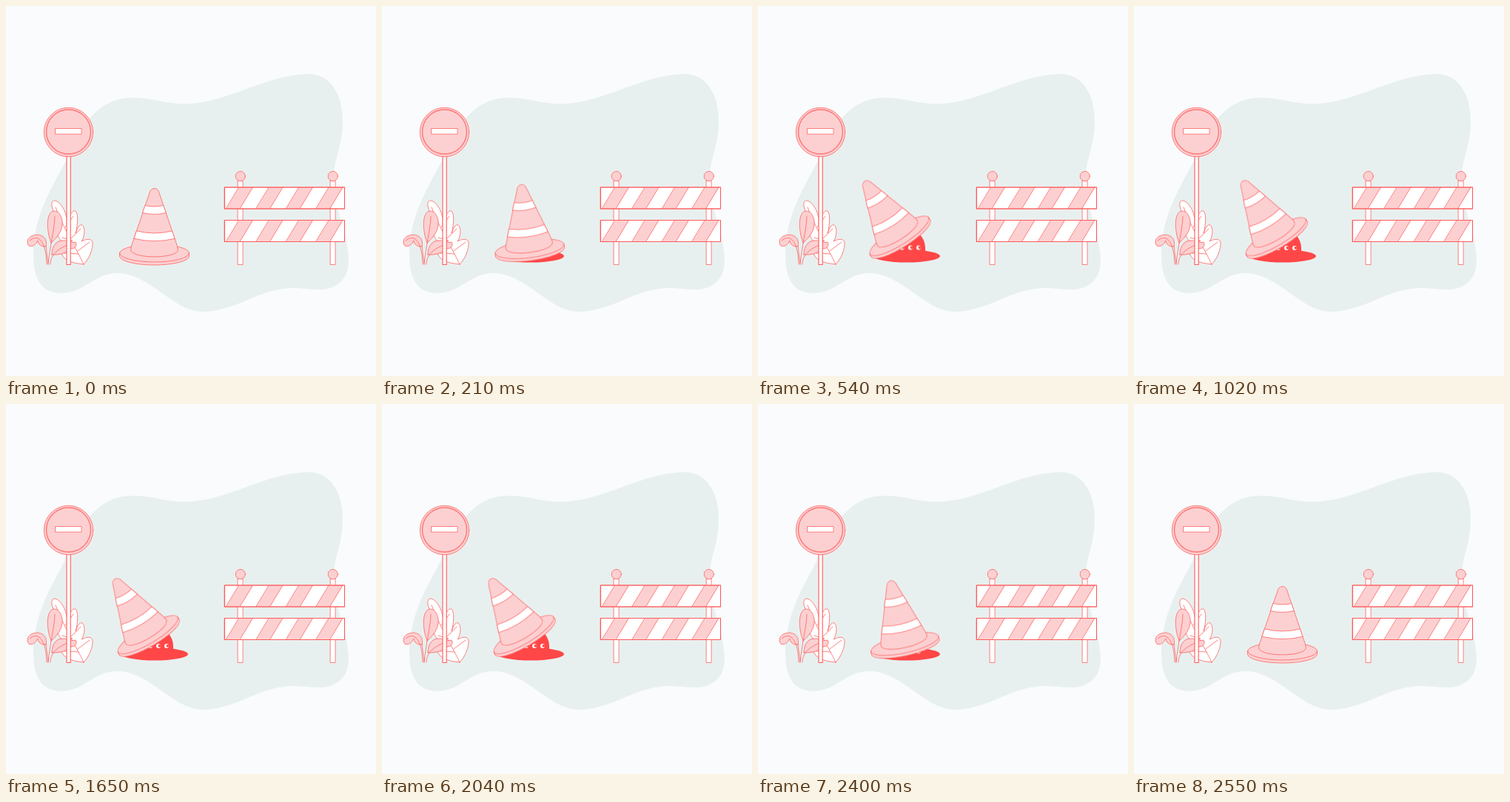
These frames come from a looping animation (500 px wide and 500 px high, 3.45 s). An HTML page:

```html
<!DOCTYPE html>
<html lang="en">
<head>
<meta charset="utf-8">
<title>Roadworks</title>
<style>
  html, body { margin: 0; width: 100%; height: 100%; overflow: hidden; background: #f9fbfd; }
  svg { display: block; width: 100vw; height: 100vh; }
  .line { stroke: #ff5a5a; stroke-width: .75; stroke-linejoin: round; stroke-linecap: round; fill: none; }
  .bold { stroke-width: 1.1; }
  .ring { stroke: #ff7676; stroke-width: 1.4; }
  .pink { fill: #fcd0d1; }
  .white { fill: #fff; }
  .red { fill: #ff4747; }

  #cone { transform-origin: 155.6px 339px; animation: tilt 3450ms linear infinite; }
  #peeker { animation: peek 3450ms linear infinite; }

  /* Percentages are milliseconds / 34.5 */
  @keyframes tilt {
    0%, 3.77% { transform: rotate(0deg); }
    9.57% { transform: rotate(-18.5deg); }
    11.59% { transform: rotate(-27deg); }
    13.33% { transform: rotate(-30.8deg); }
    14.5% { transform: rotate(-32deg); }
    15.65% { transform: rotate(-32.3deg); }
    18.26% { transform: rotate(-31deg); }
    21.45% { transform: rotate(-30.4deg); }
    29.57%, 47.54% { transform: rotate(-30.6deg); }
    56.23% { transform: rotate(-30.4deg); }
    59.13% { transform: rotate(-30.8deg); }
    61.68% { transform: rotate(-32.3deg); }
    62.9% { transform: rotate(-32deg); }
    64.2% { transform: rotate(-30.8deg); }
    66.09% { transform: rotate(-27.6deg); }
    67.77% { transform: rotate(-18.5deg); }
    73.57%, 100% { transform: rotate(0deg); }
  }
  @keyframes peek {
    0%, 3.77% { transform: translateY(12px); }
    9.57% { transform: translateY(5px); }
    13.33% { transform: translateY(0); }
    15.65% { transform: translateY(-.5px); }
    19%, 60% { transform: translateY(0); }
    66.09% { transform: translateY(3px); }
    73.57%, 100% { transform: translateY(12px); }
  }
</style>
</head>
<body>
<svg viewBox="0 0 500 500">
  <defs>
    <clipPath id="ground"><rect x="150" y="280" width="100" height="60"/></clipPath>
    <clipPath id="plank"><rect x="295.5" y="245" width="162" height="29"/></clipPath>
    <g id="eye">
      <circle class="white" r="3"/>
      <circle class="red" cx="1.4" cy="-.2" r="1.9"/>
    </g>
    <g id="post" class="line">
      <rect class="white" x="313.5" y="236" width="6.6" height="113.5"/>
      <circle class="pink" cx="316.8" cy="230" r="6.6"/>
    </g>
    <g id="board" class="line">
      <rect class="white" x="295.5" y="245" width="162" height="29"/>
      <g class="pink" clip-path="url(#plank)">
        <path id="stripe" d="M315 245h18.5l-17.5 29h-18.5z"/>
        <use href="#stripe" x="40.5"/>
        <use href="#stripe" x="81"/>
        <use href="#stripe" x="121.5"/>
      </g>
      <rect class="bold" x="295.5" y="245" width="162" height="29"/>
    </g>
  </defs>

  <path fill="#e8f0ef" d="M37 335C37 310 43 287 52 266C62 242 74 224 84 203C103 157 128 124 170 124
    C200 124 212 132 243 132C298 132 352 92 409 92C440 92 455 122 455 155C455 190 443 205 443 233
    C443 275 463 310 463 345C463 370 445 383 425 383C405 383 400 381 385 381C340 383 310 413 266 413
    C225 413 195 361 150 361C120 361 105 388 75 388C45 388 37 365 37 335Z"/>

  <!-- Plants -->
  <g class="line">
    <path class="white" d="M105 349C112 343 118 327 117 320C116 313 108 315 102 318C107 311 107 299 103 296
      C99 294 96 302 94 307C97 298 98 280 94 277C89 275 84 287 82 295C84 284 76 265 66 263
      C59 263 61 276 70 286C66 300 68 312 76 318C70 322 68 332 76 336C78 343 90 348 105 349Z"/>
    <path d="M105 349C96 330 79 303 67 272M80 299L91 284M88 314L101 301M97 331L113 319M90 317L76 313M98 335L78 334"/>
    <path class="pink" d="M61 320C55 305 54 283 62 278C70 274 77 284 76 296C75 306 67 315 61 320Z"/>
    <path d="M66 284C66 300 59 325 57 349"/>
    <path class="pink" d="M54 325C57 312 46 307 37 310C29 312 27 320 31 324C36 327 41 321 43 317C43 322 48 326 54 325Z"/>
    <path d="M32 317C42 308 54 315 55 349M54 325C55 333 56 341 57 349"/>
    <path class="pink" d="M62 336C62 322 70 316 78 317C86 317 88 321 94 319C97 324 93 328 88 328C82 332 76 337 62 336Z"/>
    <path d="M60 349C60 339 66 329 86 322"/>
  </g>

  <!-- Sign -->
  <g class="line">
    <rect class="white bold" x="82" y="203" width="5.2" height="146.5"/>
    <circle class="pink" cx="84.5" cy="170.5" r="33.2"/>
    <circle class="ring" cx="84.5" cy="170" r="30"/>
    <rect class="white" x="67" y="165.5" width="35" height="7.6"/>
  </g>

  <!-- Barrier -->
  <use href="#post"/>
  <use href="#post" x="125"/>
  <use href="#board"/>
  <use href="#board" y="44.5"/>

  <!-- Peeking creature -->
  <ellipse class="red" cx="201" cy="338" rx="45" ry="8.6"/>
  <g clip-path="url(#ground)">
    <g id="peeker">
      <path class="red" d="M176 345V327a25 25 0 0 1 50 0V345z"/>
      <use href="#eye" x="195" y="327"/>
      <use href="#eye" x="206" y="327"/>
      <use href="#eye" x="217" y="327"/>
    </g>
  </g>

  <!-- Cone -->
  <g id="cone" class="line">
    <path class="pink" d="M153.5 334v4a47 12 0 0 0 94 0v-4a47 12 0 0 0 -94 0z"/>
    <path d="M153.5 334a47 12 0 0 0 94 0"/>
    <path class="pink" d="M194.5 251C196 245 205 245 206.5 251L231 323Q233 329 232 331C226 341.5 175 341.5 169 331Q168 329 170 323Z"/>
    <path class="white" d="M188.2 269.5Q200.5 272.5 212.8 269.5L216.2 279.5Q200.5 283.5 184.8 279.5Z"/>
    <path class="white" d="M176.6 304Q200.5 310 224.5 304L228 314.3Q200.5 321 173.2 314.3Z"/>
  </g>
</svg>
</body>
</html>
```
